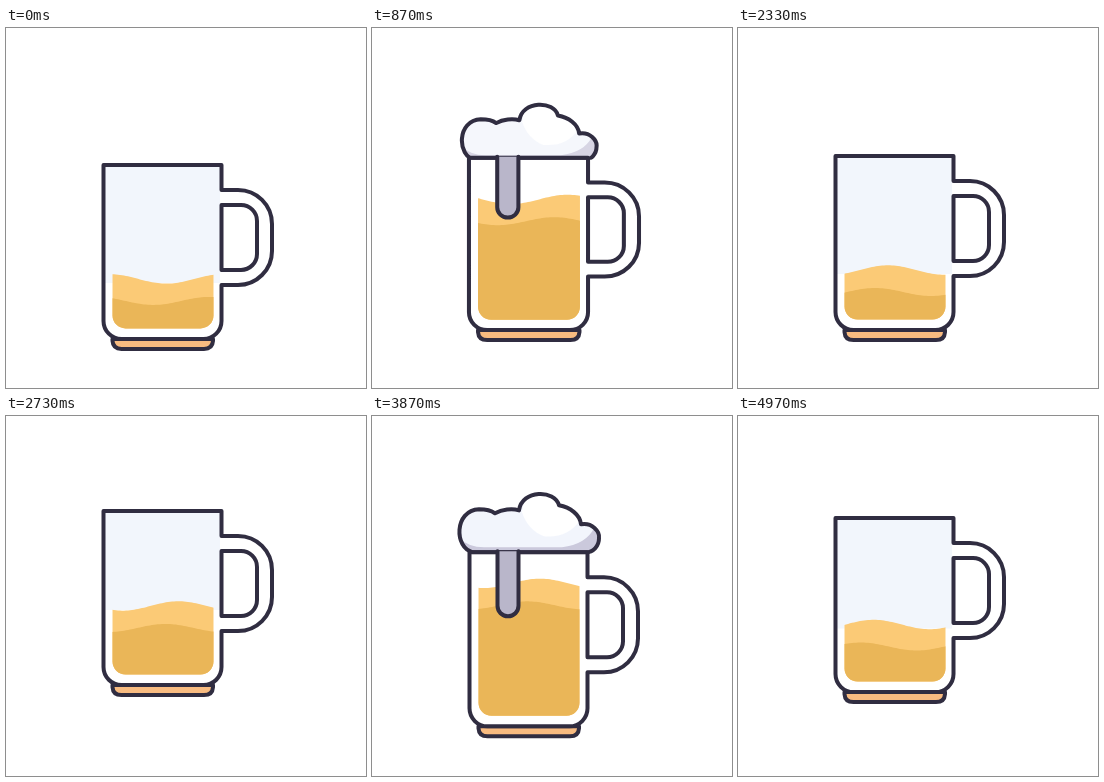
An HTML page that plays this animation: 360x360 px, repeating every 5 s.

```html
<!DOCTYPE html>
<html lang="en">
<head>
<meta charset="utf-8">
<title>Beer mug</title>
<style>
  html, body { margin: 0; width: 100%; height: 100%; overflow: hidden; background: #fff; }
  svg { display: block; width: 100%; height: 100%; }
  .ink { stroke: #302d41; stroke-width: 4; stroke-linejoin: round; stroke-linecap: round; }
  .hollow { fill: none; }
</style>
</head>
<body>
<svg viewBox="0 0 360 360">
  <defs>
    <clipPath id="beerClip"><path d="M106.5 100H207.5V278.5A13 13 0 0 1 194.5 291.5H119.5A13 13 0 0 1 106.5 278.5Z"/></clipPath>
    <clipPath id="rimClip"><path d="M60 0H260V130H60Z"/></clipPath>
    <path id="foamShape" d="M101 0C82-4 82-42 107-43C114-43 119-42 123-39C130-43 140-44 147-42C150-63 183-63 187-47C198-45 208-38 209-28C220-30 228-21 227-14C227-6 221 0 214 0Z"/>
    <clipPath id="foamClip"><use href="#foamShape"/></clipPath>
  </defs>
  <g id="mug">
    <path class="ink" fill="#f8bb80" d="M106.5 302V304Q107 312 115.5 312H198Q206.5 312 207 304V302Z"/>
    <path fill="#fff" d="M97.5 128H215.5V284A18 18 0 0 1 197.5 302H115.5A18 18 0 0 1 97.5 284Z"/>
    <path id="glass" fill="#f2f6fc"/>
    <g clip-path="url(#beerClip)">
      <path id="backWave" fill="#fbca76"/>
      <path id="frontWave" fill="#eab658"/>
    </g>
    <g clip-path="url(#rimClip)">
      <g id="foam">
        <use href="#foamShape" fill="#fff"/>
        <g id="foamShade" clip-path="url(#foamClip)">
          <path fill="#f2f5fc" d="M80-70H235V0H80Z"/>
          <path fill="#fff" d="M150-40Q152-62 172-62Q194-56 208-32Q196-14 172-16Q156-22 150-40Z"/>
          <path fill="#cbc9dc" d="M84-18Q94-5 112-5H190Q214-8 222-24L235-20V2H84Z"/>
        </g>
        <use id="foamLine" href="#foamShape" class="ink hollow"/>
      </g>
    </g>
    <path class="ink hollow" d="M215.5 128V153H232A34 34 0 0 1 266 187V214A34 34 0 0 1 232 248H215.5V284A18 18 0 0 1 197.5 302H115.5A18 18 0 0 1 97.5 284V128Z"/>
    <path class="ink hollow" d="M215.5 168H235A16 16 0 0 1 251 184V217A16 16 0 0 1 235 233H215.5Z"/>
    <path id="drip" class="ink" fill="#b9b6ca"/>
  </g>
</svg>
<script>
const LOOP = 5000, CYCLE = 2380, LEAD = 50;
const el = id => document.getElementById(id);

const linear = u => u;
const smooth = u => u * u * (3 - 2 * u);
const rise = u => 1 - (1 - u) ** 2;
const settle = u => 1 - (1 - u) ** 3;
const fall = u => u * u;

// Each key is [time, value, easing towards this key].
function tween(keys, t) {
  const i = keys.findIndex(k => k[0] > t);
  if (i === 0) return keys[0][1];
  if (i < 0) return keys[keys.length - 1][1];
  const [t0, v0] = keys[i - 1], [t1, v1, ease = linear] = keys[i];
  return v0 + (v1 - v0) * ease((t - t0) / (t1 - t0));
}

const hop = [[-50, 0], [10, 9.5, smooth], [350, -33, rise], [520, 0, fall],
  [1405, 0], [1515, 9.5, smooth], [1750, -33, rise], [1895, 0, fall]];
const squash = [[520, 0], [600, .06, rise], [960, 0, smooth],
  [1890, 0], [1930, .06, rise], [2150, 0, smooth]];
const depth = [[0, 114], [1130, 31, smooth], [1770, 31], [2130, 114, smooth]];
const foamSize = [[560, 0], [1120, 1, settle], [1770, 1], [1900, 0, fall]];
const dripSize = [[500, 0], [1100, 64, settle], [1770, 64], [1900, 0, fall]];

// Wave travel in wavelengths over the whole loop.
const drift = [[0, .93], [870, 1.74], [1770, 2.77], [2330, 3.34],
  [3130, 3.74], [3870, 4.5], [5000, 5.23]];

function wave(level, peak, amp) {
  let d = 'M104 310';
  for (let x = 104; x <= 210; x += 2) {
    d += `L${x} ${(level - amp * Math.cos((x - peak) / 112 * 2 * Math.PI)).toFixed(2)}`;
  }
  return d + 'V310Z';
}

function draw(now) {
  const t = now % LOOP;
  const p = (t + LEAD) % CYCLE - LEAD;
  const k = tween(squash, p);
  el('mug').setAttribute('transform',
    `translate(157 ${313 + tween(hop, p)}) scale(${1 + k} ${1 - k}) translate(-157 -313)`);

  const level = 128 + tween(depth, p), peak = tween(drift, t) * 112;
  el('backWave').setAttribute('d', wave(level, peak, 4.7));
  el('frontWave').setAttribute('d', wave(level + 22, peak - 13, 4));

  // The foam swells up from behind the rim.
  const f = tween(foamSize, p), size = .5 + f / 2;
  el('foam').style.display = f > .02 ? '' : 'none';
  el('foam').setAttribute('transform',
    `translate(157 ${128 + 54 * (1 - size)}) scale(${size}) translate(-157 0)`);
  el('foamLine').style.strokeWidth = 4 / size;
  el('foamShade').setAttribute('opacity', Math.min(1, Math.max(0, (f - .72) * 4)));
  el('glass').setAttribute('d', `M99 128H214V${level + 4}H99Z`);
  el('glass').setAttribute('opacity', Math.max(0, 1 - 1.4 * f));

  const drop = tween(dripSize, p), cap = Math.min(10.5, drop);
  el('drip').style.display = drop > 1 ? '' : 'none';
  el('drip').setAttribute('d', `M125.5 127v${drop - cap + 1}a10.5 ${cap} 0 0 0 21 0V127`);
}

const start = performance.now();
function frame() {
  draw(performance.now() - start);
  requestAnimationFrame(frame);
}
frame();
</script>
</body>
</html>
```
